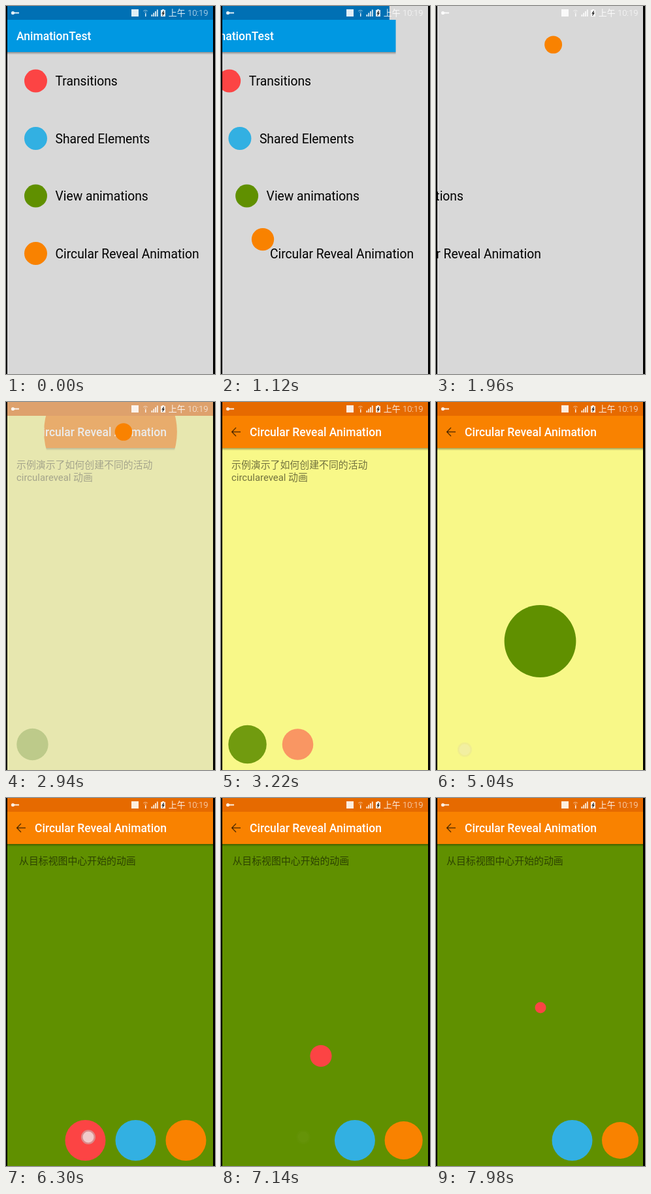
Recreate the animation shown at these times as an HTML page with a canvas. Size 320 by 560 pixels, loop 8000 ms.

```html
<!DOCTYPE html>
<html lang="zh-CN">
<head>
<meta charset="utf-8">
<style>
html, body { margin: 0; width: 320px; height: 560px; overflow: hidden; background: #000; }
canvas { display: block; }
</style>
</head>
<body>
<canvas id="stage" width="320" height="560"></canvas>
<script>
const ctx = document.getElementById('stage').getContext('2d');
const LOOP = 8000, STEP = 140, LEFT = 2, RIGHT = 317;
const RED = '#fc4444', BLUE = '#32b0e2', GREEN = '#609000', ORANGE = '#f98200';
const GRAY = '#d8d8d8', YELLOW = '#f8f888';
const FONT = 'Roboto, "Noto Sans CJK SC", "Noto Sans CJK", sans-serif';

const rows = [
  ['Transitions', RED, 114],
  ['Shared Elements', BLUE, 201.5],
  ['View animations', GREEN, 289],
  ['Circular Reveal Animation', ORANGE, 376.5]
];

const clamp = x => Math.max(0, Math.min(1, x));
const progress = (t, start, length) => clamp((t - start) / length);
const mix = (a, b, p) => a + (b - a) * p;

// Cubic easing with control points (x1, 0 or x1) and (x2, 1)
function ease(x, x1, x2, y1 = 0) {
  let lo = 0, hi = 1, s = 0.5;
  for (let i = 0; i < 24; i++) {
    s = (lo + hi) / 2;
    const bx = 3 * x1 * s * (1 - s) ** 2 + 3 * x2 * s * s * (1 - s) + s ** 3;
    if (bx < x) lo = s; else hi = s;
  }
  return 3 * y1 * s * (1 - s) ** 2 + 3 * s * s * (1 - s) + s ** 3;
}
const fastOutSlowIn = x => ease(x, 0.4, 0.2);
const slowIn = x => ease(x, 0, 0.2);

// Arc that leaves diagonally and arrives vertically
function arc(x0, y0, x1, y1) {
  const turn = y1 + ((x1 - x0) ** 2 + (y1 - y0) ** 2) / (2 * Math.abs(y1 - y0));
  const path = document.createElementNS('http://www.w3.org/2000/svg', 'path');
  path.setAttribute('d', `M${x0} ${y0}C${(x0 + x1) / 2} ${(y0 + turn) / 2} ${x1} ${(turn + y1) / 2} ${x1} ${y1}`);
  const length = path.getTotalLength();
  return p => path.getPointAtLength(p * length);
}
const orangeArc = arc(45.5, 376.5, 180, 45.5);
const redArc = arc(121.5, 521, 160, 319);

function rect(x, y, w, h, color) {
  ctx.fillStyle = color;
  ctx.fillRect(x, y, w, h);
}

function circle(x, y, r, color, alpha = 1) {
  ctx.globalAlpha = alpha;
  ctx.fillStyle = color;
  ctx.beginPath();
  ctx.arc(x, y, r, 0, 7);
  ctx.fill();
  ctx.globalAlpha = 1;
}

function text(str, x, y, size, color, weight = 400, align = 'left') {
  ctx.font = `${weight} ${size}px ${FONT}`;
  ctx.textAlign = align;
  ctx.fillStyle = color;
  ctx.fillText(str, x, y);
}

function line(points, color, width) {
  ctx.strokeStyle = color;
  ctx.lineWidth = width;
  ctx.beginPath();
  points.forEach(([x, y]) => ctx.lineTo(x, y));
  ctx.stroke();
}

function clipCircle(x, y, r, draw) {
  ctx.save();
  ctx.beginPath();
  ctx.arc(x, y, r, 0, 7);
  ctx.clip();
  draw();
  ctx.restore();
}

function bar(x, color, title, titleX) {
  const shade = ctx.createLinearGradient(0, 70, 0, 74);
  shade.addColorStop(0, 'rgba(0,0,0,.35)');
  shade.addColorStop(1, 'rgba(0,0,0,0)');
  rect(x + LEFT, 70, RIGHT - LEFT, 4, shade);
  rect(x + LEFT, 21, RIGHT - LEFT, 49, color);
  text(title, x + titleX, 52, 17.5, '#fff', 500);
}

function statusIcons() {
  const white = 'rgba(255,255,255,.88)';
  circle(10.5, 10.5, 2.6, white);
  line([[12, 10.5], [20, 10.5]], white, 2);
  rect(192, 5, 11, 11, white);
  for (const r of [2, 4.5]) {
    ctx.strokeStyle = 'rgba(255,255,255,.6)';
    ctx.lineWidth = 1;
    ctx.beginPath();
    ctx.arc(213.5, 11, r, -2.4, -0.74);
    ctx.stroke();
  }
  rect(213, 11, 1.5, 5, white);
  for (let i = 0; i < 4; i++) rect(222.5 + i * 2.8, 13 - i * 2.5, 1.8, 3 + i * 2.5, white);
  rect(237, 6, 7, 10, white);
  rect(239, 5, 3, 1, white);
  line([[241.8, 7.5], [239.5, 11], [241.8, 11], [239.5, 14.5]], '#222', 1.3);
  text('上午 10:19', 309.5, 15.2, 13, white, 300, 'right');
}

// Upper elements start sliding out first
const slide = (t, y) => -1.664e-4 * Math.max(0, t - 1060 + (376.5 - y) * 1.463) ** 2;

function drawList(t) {
  rect(0, 0, 320, 560, GRAY);
  rect(slide(t, 10) + LEFT, 0, RIGHT - LEFT, 21, '#0070b4');
  bar(slide(t, 45), '#0098e2', 'AnimationTest', 16);
  rows.forEach(([label, color, y], i) => {
    const x = slide(t, y);
    if (i < 3) circle(x + 45.5, y, 17.5, color);
    text(label, x + 75.5, y + 7.3, 19.3, '#000');
  });
}

function drawIntro(t) {
  const ink = 'rgba(0,0,0,.54)';
  text('示例演示了如何创建不同的活动', 16, 101, 14.9, ink);
  text('circulareveal', 16, 119.5, 14.9, ink);
  text('动画', 103, 119.5, 14.9, ink);
  [GREEN, RED, BLUE, ORANGE].forEach((color, i) => {
    const p = slowIn(progress(t, 2741 + i * 293, 836));
    circle(40.5 + i * 77, 521, 31 * (0.5 + p / 2), color, p);
  });
}

function drawGreen(t) {
  const p = fastOutSlowIn(progress(t, 6560, 1400));
  rect(0, 70, 320, 490, GREEN);
  text('从目标视图中心开始的动画', mix(20, 16, p), 101, 14.9, 'rgba(0,0,0,.54)');
  circle(mix(198.5, 208.5, p), 521, 31, BLUE);
  circle(mix(275.5, 282, p), 521, mix(31, 28, p), ORANGE);
  const red = redArc(p);
  circle(red.x, red.y, mix(31, 8.5, p), RED);
}

function touch(t, x, y, down, up) {
  if (t < down) return;
  const alpha = 1 - progress(t, up, 600);
  circle(x, y, 11, '#c8b8b8', alpha * 0.6);
  circle(x, y, 8.5, '#fff', alpha * 0.55);
}

function drawDetail(t) {
  rect(0, 0, 320, 560, YELLOW);
  const grow = 590 * progress(t, 4613, 1400) ** 2;
  if (t < 4613) drawIntro(t);
  else clipCircle(159.5, 364, grow, () => drawGreen(t));
  rect(0, 0, 320, 21, '#e66a00');
  clipCircle(160, 45.5, 316 * progress(t, 2145, 1400) ** 2, () => {
    bar(0, ORANGE, 'Circular Reveal Animation', 44);
    const brown = 'rgba(0,0,0,.62)';
    line([[30, 45.5], [17, 45.5]], brown, 1.5);
    line([[23, 39], [16.7, 45.5], [23, 52]], brown, 1.5);
  });
  touch(t, 44, 529, 4340, 4613);
  touch(t, 126, 516, 6160, 6560);
}

function draw(t) {
  const shown = progress(t, 2730, 420);
  if (shown > 0) {
    drawDetail(t);
    ctx.globalAlpha = 1 - shown;
    rect(0, 0, 320, 560, GRAY);
    ctx.globalAlpha = 1;
  } else {
    drawList(t);
  }
  if (shown < 1) {
    const p = fastOutSlowIn(progress(t, 895, 1400));
    const spot = orangeArc(p);
    circle(spot.x, spot.y, mix(17.5, 13.3, p), ORANGE);
  }
  statusIcons();
  rect(0, 0, LEFT, 560, '#000');
  rect(RIGHT, 0, 320 - RIGHT, 560, '#000');
}

const begin = performance.now();
function tick() {
  const t = (performance.now() - begin) % LOOP;
  draw(Math.floor(t / STEP) * STEP);
  requestAnimationFrame(tick);
}
tick();
</script>
</body>
</html>
```
